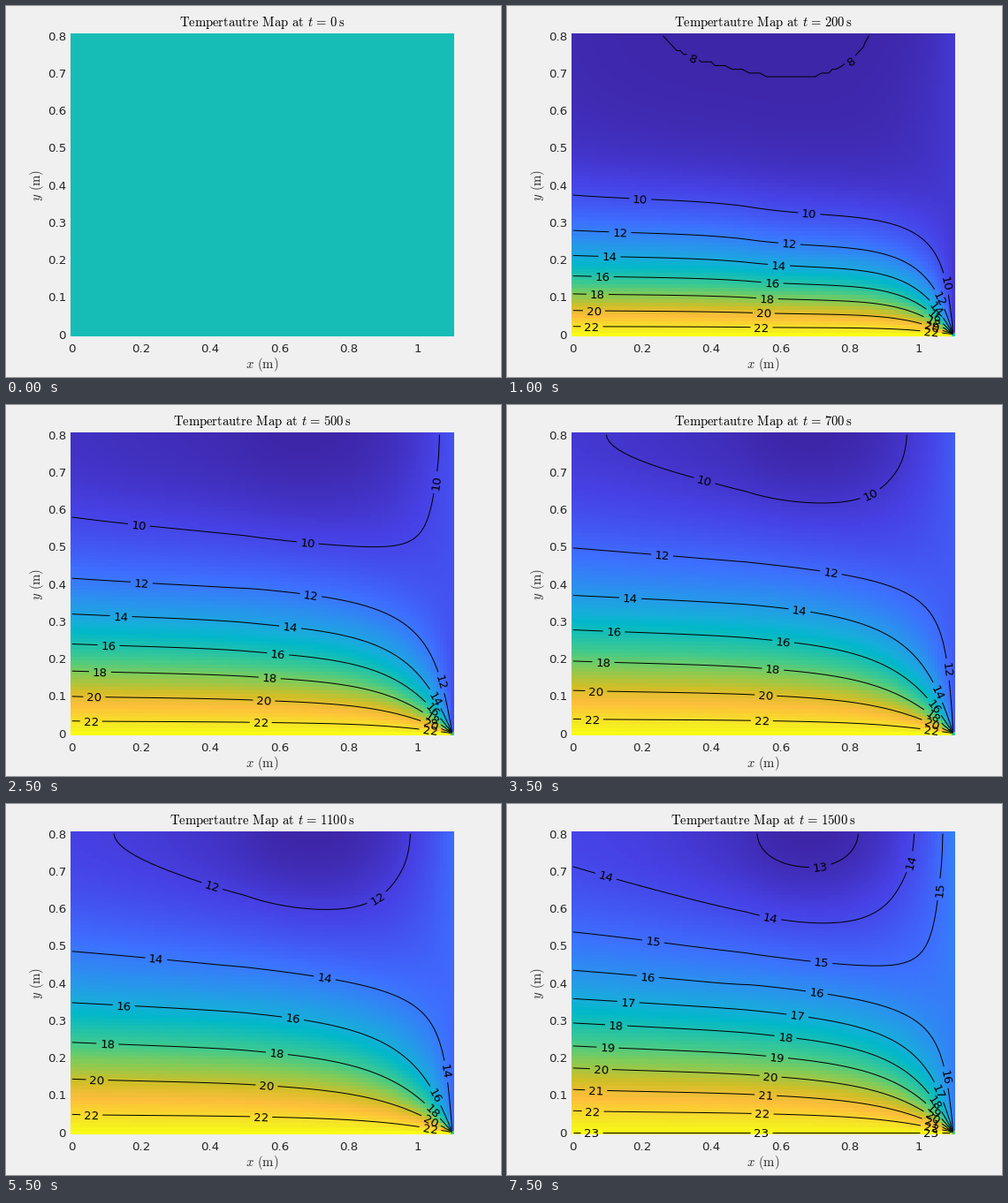
Animation of 560x420 px, one loop 8000 ms. Source, as a matplotlib script:

```python
import math
import numpy as np
import matplotlib.pyplot as plt
from matplotlib.animation import ArtistAnimation
from matplotlib.collections import LineCollection
from matplotlib.colors import LinearSegmentedColormap

plt.rcParams["font.family"] = "DejaVu Sans"
plt.rcParams["mathtext.fontset"] = "cm"

W, H, DPI = 560, 420, 96
NX, NY, D = 111, 81, 0.01             # nodes and spacing (m)
LEFT, RIGHT, TOP, BOTTOM = 72.8, 506.8, 31.5, 373.8
DT, STEPS, FRAMES = 0.125, 800, 16    # 100 s of heat flow per frame
SPACING, MIN_REST = 192, 30           # px between labels, px left for the ends
INK = "0.15"

# blue - teal - yellow ramp through a few key colours
RAMP = {0: "#3e26a8", 6: "#4741e5", 14: "#3e6fff", 20: "#2b91ef",
        26: "#18addb", 29: "#01b8ca", 37: "#3fca8e", 42: "#81cc59",
        48: "#d1bf27", 53: "#febe3c", 60: "#f5e924", 63: "#f9fb15"}
CMAP = LinearSegmentedColormap.from_list(
    "ramp", [(i / 63, c) for i, c in RAMP.items()])


def px(x):
    return LEFT + (x / D + 0.5) * (RIGHT - LEFT) / NX


def py(y):
    return BOTTOM - (y / D + 0.5) * (BOTTOM - TOP) / NY


def simulate():
    """Yield the temperature field of a four-material plate every 100 s."""
    x, y = np.meshgrid((np.arange(NX - 1) + 0.5) * D,
                       (np.arange(NY - 1) + 0.5) * D)
    west = x < 0.5
    k = np.where(west, np.where(y < 0.4, 170.0, 200.0), 140.0)
    rho_c = np.where(west, np.where(y < 0.4, 1500 * 750.0, 1900 * 810.0),
                     np.where(y < 0.7, 1600 * 770.0, 2500 * 930.0))
    gx = (k[:-1] + k[1:]) / 2
    gy = (k[:, :-1] + k[:, 1:]) / 2
    cap = (rho_c[:-1, :-1] + rho_c[1:, :-1]
           + rho_c[:-1, 1:] + rho_c[1:, 1:]) / 4
    rate = DT / (cap * D * D)
    k_left, k_top = k[:, 0], k[-1]

    T = np.full((NY, NX), 8.0)
    yield T.copy()
    for step in range(1, STEPS * (FRAMES - 1) + 1):
        fx = gx * np.diff(T[1:-1], axis=1)
        fy = gy * np.diff(T[:, 1:-1], axis=0)
        T[1:-1, 1:-1] += rate * (np.diff(fx, axis=1) + np.diff(fy, axis=0))
        # warm fluid on the left, heat drawn from the top, warming right edge
        T[:-1, 0] = (k_left * T[:-1, 1] + 9 * D * 33) / (k_left + 9 * D)
        T[-1, :-1] = T[-2, :-1] - 60 * D / k_top
        T[:, -1] = 8 + 0.005 * step * DT
        T[0] = 23
        T[0, -1] = (23 + T[1, -1]) / 2
        if step % STEPS == 0:
            # changes below the solver's resolution do not show
            yield np.where(abs(T - 8) < 0.0025, 8.0, T)


def cut(pts, s, a, b):
    """Part of a polyline between arc lengths a and b."""
    ends = [[np.interp(v, s, pts[:, 0]), np.interp(v, s, pts[:, 1])]
            for v in (a, b)]
    return np.vstack([ends[:1], pts[(s > a) & (s < b)], ends[1:]])


def label_line(pts, text):
    """Split a contour at its labels; return the pieces and the labels."""
    if pts[0, 0] > pts[-1, 0]:
        pts = pts[::-1]
    s = np.r_[0, np.cumsum(np.hypot(*np.diff(pts, axis=0).T))]
    total = s[-1]
    if total < MIN_REST:
        return [pts], []
    rest = (total - MIN_REST) % SPACING + MIN_REST
    half = 4.25 * len(text) + 4
    pieces, labels, start = [], [], 0
    for c in np.arange(0.63 * rest - 6, total, SPACING):
        gap = cut(pts, s, max(c - half, 0), min(c + half, total))
        dx, dy = gap[-1] - gap[0]
        angle = math.degrees(math.atan2(-dy, dx))
        if abs(angle) > 90:
            angle -= math.copysign(180, angle)
        x, y = cut(pts, s, c, total)[0]
        labels.append((x, y, text, angle))
        if c - half > start:
            pieces.append(cut(pts, s, start, c - half))
        start = c + half
    if start < total:
        pieces.append(cut(pts, s, start, total))
    return pieces, labels


fig = plt.figure(figsize=(W / DPI, H / DPI), dpi=DPI, facecolor="#f0f0f0")
ax = fig.add_axes([0, 0, 1, 1])
ax.set_axis_off()
ax.set_autoscale_on(False)


def put(x, y, text, size=10, color=INK, ha="center", va="center_baseline",
        angle=0):
    return ax.text(x, y, text, size=size, color=color, ha=ha, va=va,
                   rotation=angle, rotation_mode="anchor", zorder=3)


for i in range(6):
    put(px(i * 0.2), 387.3, f"{i * 0.2:.2g}")
for i in range(9):
    put(68, py(i * 0.1), f"{i * 0.1:.2g}", ha="right")

# mathtext measures spaces in widths of "m", hence the wider values
GAP = r"\hspace{0.38}"
put(290, 410, rf"$x{GAP}\mathrm{{(m)}}$", 11, va="baseline")
put(38.6, 202.5, rf"$y{GAP}\mathrm{{(m)}}$", 11, va="baseline", angle=90)
TITLE = ("$" + GAP.join(r"\mathrm{%s}" % w for w in ("Tempertautre", "Map", "at"))
         + GAP + r"t\hspace{0.117}=\hspace{0.117}%d\hspace{0.19}\mathrm{s}$")

grid_x, grid_y = px(np.arange(NX) * D), py(np.arange(NY) * D)


def contours(T, low, high):
    """Labelled level lines; the step follows the range of the field."""
    step = 1 if high - low < 12 else 2
    levels = np.arange(math.ceil(low / step) * step, high + 1e-9, step)
    cs = ax.contour(grid_x, grid_y, T, levels - 1e-6)
    pieces, texts = [], []
    for level, segs in zip(levels, cs.allsegs):
        for seg in segs:
            if len(seg) > 1:
                parts, labels = label_line(seg, f"{level:.0f}")
                pieces += parts
                texts += [put(x, y, s, color="black", angle=a)
                          for x, y, s, a in labels]
    cs.remove()
    lines = LineCollection(pieces, colors="black", linewidths=0.75, zorder=2)
    ax.add_collection(lines, autolim=False)
    return [lines] + texts


def build(i, T):
    """All changing artists of one time step."""
    low, high = T.min(), T.max()
    flat = high == low
    image = ax.imshow(T, cmap=CMAP, vmin=low - flat, vmax=high + flat,
                      origin="lower", extent=(LEFT, RIGHT, BOTTOM, TOP),
                      aspect="auto", interpolation="nearest", zorder=1)
    title = put(290, 23, TITLE % (100 * i), 11, "black", va="baseline")
    return [image, title] + ([] if flat else contours(T, low, high))


scenes = [build(i, T) for i, T in enumerate(simulate())]
ax.set(xlim=(0, W), ylim=(H, 0))

anim = ArtistAnimation(fig, scenes, interval=500, repeat=True, repeat_delay=0)
plt.show()
```
